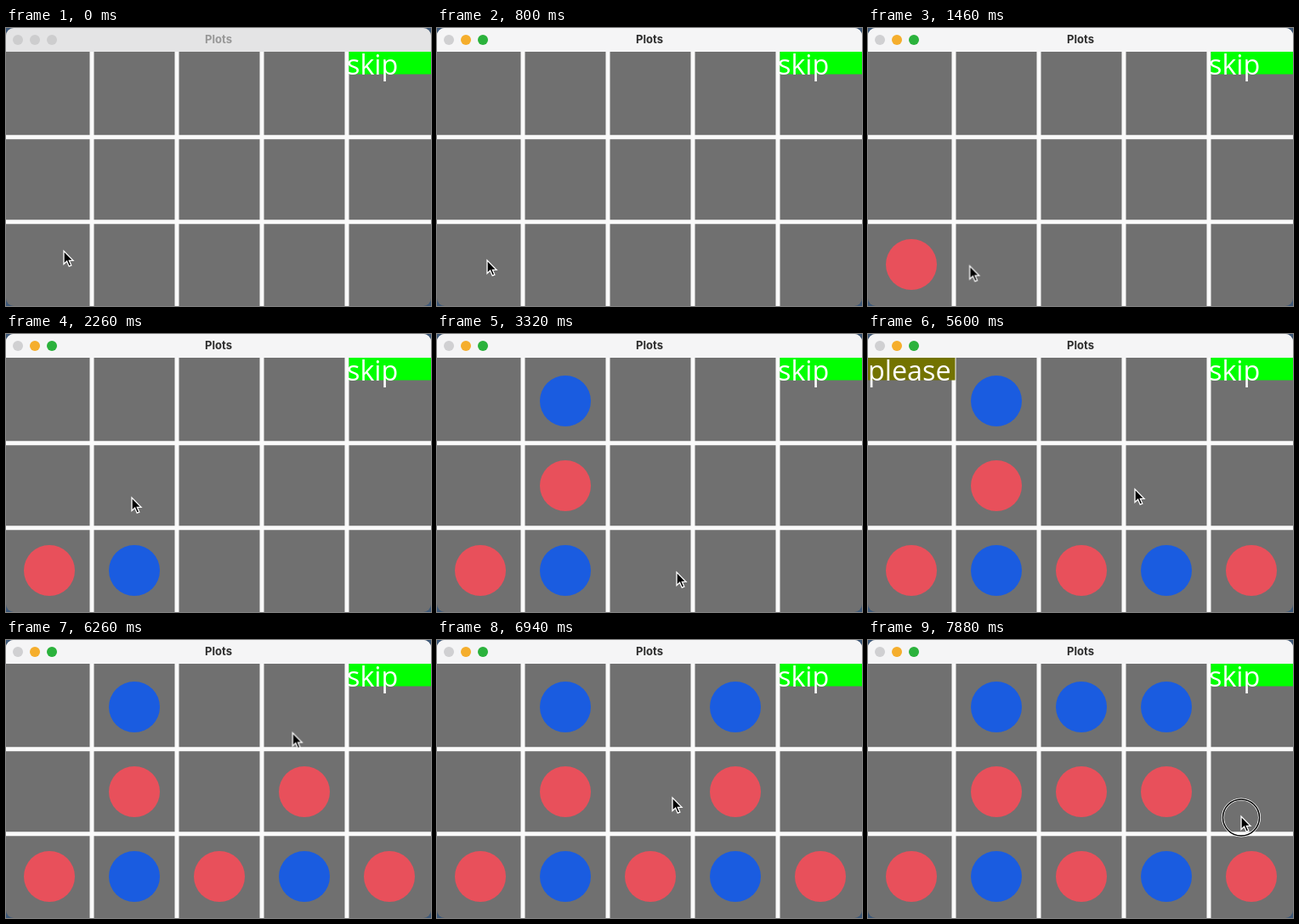
Animation, 500 px wide and 328 px high, one loop 8 s. Source, as an HTML page without scripts:

```html
<!DOCTYPE html>
<html lang="en">
<head>
<meta charset="utf-8">
<title>Plots</title>
<style>
  /* --f counts 60 ticks per loop; parts appear at tick --in and may leave at --out */
  @property --f { syntax: "<number>"; inherits: true; initial-value: 0; }

  html, body { margin: 0; width: 100%; height: 100%; overflow: hidden; background: #3d5878; }
  svg { display: block; width: 500px; height: 328px; animation: tick 8s steps(60) -14ms infinite; }
  @keyframes tick { to { --f: 60; } }

  .show { opacity: calc(var(--f) - var(--in) + 1); }
  .hint { opacity: min(var(--f) - 36, 44 - var(--f)); }

  .title { font: 700 13px Inter, Roboto, sans-serif; text-anchor: middle; }
  .label { font: 500 32.3px "Open Sans", "Noto Sans", sans-serif; fill: #fff; }
  .red { fill: #e8505b; }
  .blue { fill: #1a5ce0; }

  .cursor { animation: move 8s -14ms infinite; }
  .ring { fill: none; animation: press 8s step-end -14ms infinite; }

  @keyframes move {
    0% { transform: translate(68px, 263px); animation-timing-function: steps(6); }
    10%, 15% { transform: translate(59px, 274px); animation-timing-function: steps(3); }
    20%, 23.333% { transform: translate(150px, 284px); animation-timing-function: steps(3); }
    28.333%, 31.667% { transform: translate(148px, 193px); animation-timing-function: steps(2); }
    35%, 36.667% { transform: translate(150px, 85px); animation-timing-function: steps(3); }
    41.667%, 45% { transform: translate(282px, 281px); animation-timing-function: steps(3); }
    50%, 51.667% { transform: translate(355px, 285px); animation-timing-function: steps(3); }
    56.667%, 58.333% { transform: translate(466px, 290px); animation-timing-function: steps(2); }
    61.667%, 68.333% { transform: translate(320px, 185px); animation-timing-function: steps(1); }
    70%, 73.333% { transform: translate(314px, 183px); animation-timing-function: steps(4); }
    80%, 81.667% { transform: translate(345px, 85px); animation-timing-function: steps(3); }
    86.667%, 90% { transform: translate(277px, 186px); animation-timing-function: steps(2); }
    93.333%, 95% { transform: translate(258px, 82px); animation-timing-function: steps(2); }
    98.333%, 100% { transform: translate(439px, 208px); }
  }

  @keyframes press {
    0%, 6.667%, 15%, 23.333%, 33.333%, 38.333%, 46.667%, 53.333%, 60%, 63.333%,
    75%, 83.333%, 91.667%, 96.667% { opacity: 0; }
    3.333%, 11.667%, 20%, 30%, 35%, 43.333%, 50%, 56.667%, 61.667%,
    71.667%, 80%, 88.333%, 93.333%, 98.333%, 100% { opacity: 1; }
  }
</style>
</head>
<body>
<svg viewBox="0 0 500 328">
  <defs>
    <clipPath id="win"><rect width="500" height="328" rx="9"/></clipPath>
    <circle id="disc" r="30"/>
  </defs>

  <g clip-path="url(#win)">
    <rect width="500" height="328" fill="#707070"/>
    <path d="M101 28V328M201 28V328M301 28V328M401 28V328M0 128.7H500M0 228.7H500" stroke="#fafafa" stroke-width="5"/>

    <!-- title bar: inactive, then active -->
    <rect width="500" height="28" fill="#e4e4e5"/>
    <g fill="#cdcdce">
      <circle cx="14" cy="14" r="6"/><circle cx="34" cy="14" r="6"/><circle cx="54" cy="14" r="6"/>
    </g>
    <text class="title" x="250" y="18" fill="#979797">Plots</text>
    <g class="show" style="--in:3">
      <rect width="500" height="28" fill="#f5f5f6"/>
      <circle cx="14" cy="14" r="6" fill="#d0d0d2"/>
      <circle cx="34" cy="14" r="6" fill="#f5ae2d"/>
      <circle cx="54" cy="14" r="6" fill="#2bb23c"/>
      <text class="title" x="250" y="18" fill="#2d2d2d">Plots</text>
    </g>

    <rect x="403.5" y="28" width="97" height="26.5" fill="#0f0"/>
    <text class="label" x="401" y="55">skip</text>
    <g class="hint">
      <rect y="28" width="102.5" height="26.5" fill="#737300"/>
      <text class="label" x="0" y="55">please</text>
    </g>

    <g>
      <use href="#disc" class="show red" x="51" y="279" style="--in:8"/>
      <use href="#disc" class="show blue" x="151" y="279" style="--in:13"/>
      <use href="#disc" class="show red" x="151" y="179" style="--in:19"/>
      <use href="#disc" class="show blue" x="151" y="79" style="--in:22"/>
      <use href="#disc" class="show red" x="251" y="279" style="--in:27"/>
      <use href="#disc" class="show blue" x="351" y="279" style="--in:31"/>
      <use href="#disc" class="show red" x="451" y="279" style="--in:35"/>
      <use href="#disc" class="show red" x="351" y="179" style="--in:44"/>
      <use href="#disc" class="show blue" x="351" y="79" style="--in:49"/>
      <use href="#disc" class="show red" x="251" y="179" style="--in:54"/>
      <use href="#disc" class="show blue" x="251" y="79" style="--in:57"/>
    </g>
  </g>

  <g class="cursor">
    <g class="ring">
      <circle cy="1.5" r="21.5" stroke="#fff" stroke-width="3"/>
      <circle cy="1.5" r="21.5" stroke="#000" stroke-width="1.5"/>
    </g>
    <path d="M0 0V15.5L3.6 12.2L6.2 18.2L8.8 17.1L6.3 11.3H11Z" stroke="#fff" stroke-width="1.3"/>
  </g>
</svg>
</body>
</html>
```
